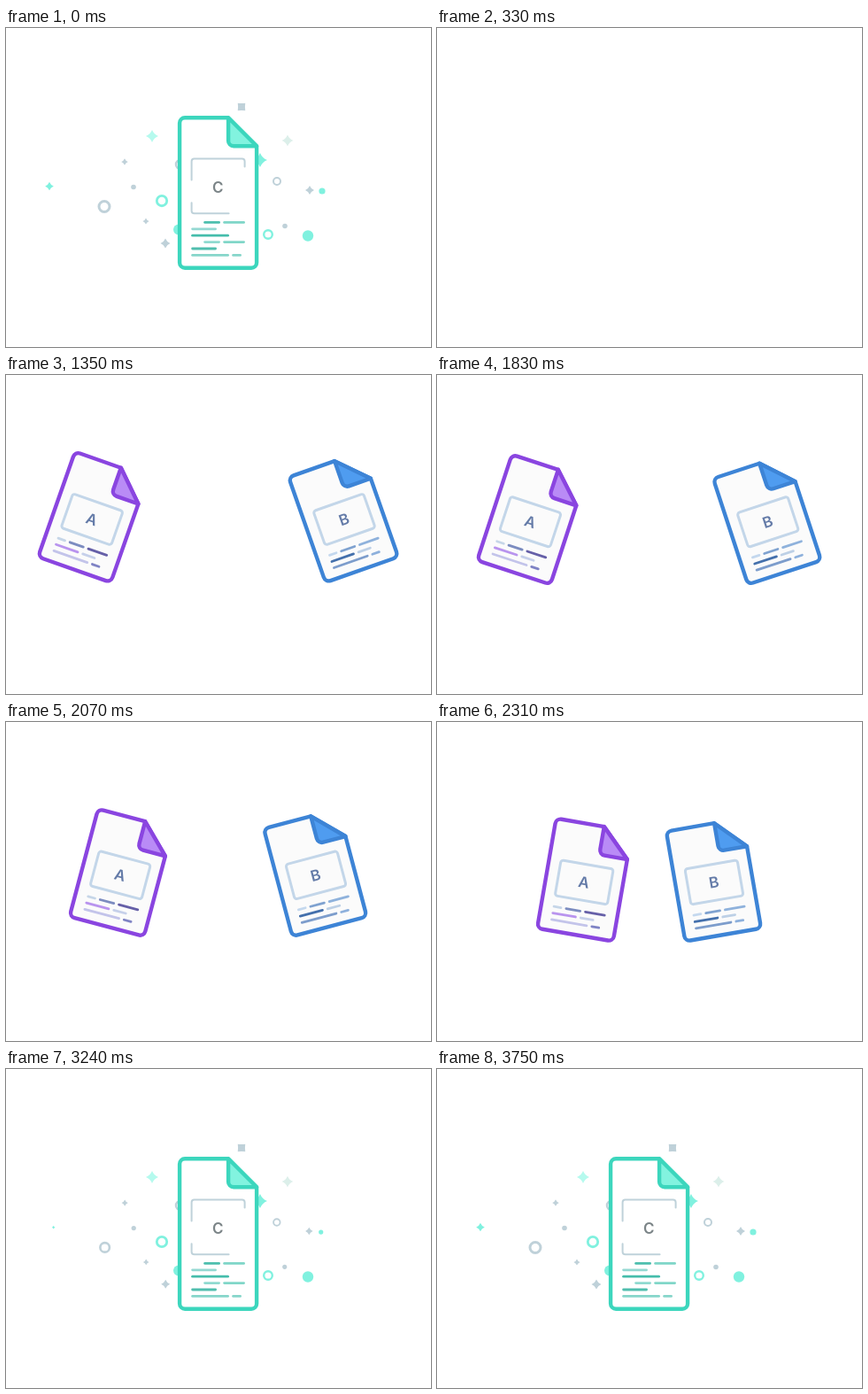
These frames come from a looping animation (480x360 px, 4500 ms). An HTML page with a canvas:

```html
<!DOCTYPE html>
<html lang="en">
<head>
<meta charset="utf-8">
<title>Two documents merge into one</title>
<style>
  html, body { margin: 0; width: 100%; height: 100%; overflow: hidden; background: #fff; }
  canvas { display: block; }
</style>
</head>
<body>
<canvas id="stage" width="480" height="360"></canvas>
<script>
const ctx = document.getElementById('stage').getContext('2d');
const LOOP = 4500, STEP = 30;
const CX = 239.6, CY = 186, SWING = 427, SWING_Y = 184.4, MAX_ANGLE = 19.85;
const HALF = 43.5, FOLD = 32;

const GREY = '#bfd1d9', CYAN = '#80f1df';
const THEMES = {
  A: { line: '#8a45e0', fold: '#b98bf6', paper: '#fbfbfb', text: '#647ba8', box: '#c3d6e9',
       dashes: ['#c6d6e8', '#7c8cc0', '#6660a8', '#b994ee', '#c6d0ea', '#c3c4ea', '#7f83c4'] },
  B: { line: '#3d84d6', fold: '#4f9cf0', paper: '#fbfbfb', text: '#647ba8', box: '#c3d6e9',
       dashes: ['#c4d8ee', '#7fa2d0', '#8fb2dc', '#4470ac', '#bdd0e6', '#7d9dcc', '#8db0dc'] },
  C: { line: '#3cd6bd', fold: '#82f3df', paper: '#fff', text: '#7b8487', box: '#bfd2da',
       dashes: [null, '#4dbfae', '#7fd6c8', '#94d8d2', null, '#45bdab', null] }
};
const LOWER_C = [null, '#8fdad0', '#80d6c8', '#50beae', null, '#86d6ca', '#86d6ca'];

// Row, start and end of each text dash
const DASHES = [[0, -29, -21], [0, -15, 1], [0, 7, 29], [1, -29, -3], [1, 3, 17], [2, -29, 11], [2, 17, 25]];

// Kind, x, y, radius, colour, delay
const PARTICLES = [
  ['clover', 266, 89, 6, GREY, 0],
  ['star', 165, 122, 7, '#b5faee', 0],
  ['star', 318, 127, 6.5, '#dcefea', 120],
  ['ring', 176, 195, 5.7, CYAN, 0],
  ['dot', 195, 227.5, 6, CYAN, 0],
  ['star', 287, 149, 8, CYAN, 30],
  ['ring', 296, 233, 4.8, CYAN, 0],
  ['dot', 341, 234.5, 6.2, CYAN, 0],
  ['ring', 197, 154, 5, GREY, 0],
  ['star', 134, 151, 3.8, GREY, 180],
  ['dot', 144, 179.5, 2.8, GREY, 210],
  ['star', 158, 218, 3.6, GREY, 210],
  ['star', 180, 243, 5.5, GREY, 240],
  ['ring', 306, 173, 4, GREY, 210],
  ['dot', 315, 223.5, 2.8, GREY, 240],
  ['ring', 111, 201.5, 6, GREY, 270],
  ['star', 343, 183, 5, GREY, 300],
  ['dot', 357, 184, 3.6, CYAN, 360],
  ['star', 49, 178.5, 4.8, CYAN, 480]
];

const clamp = v => Math.max(0, Math.min(1, v));
const easeOut = v => 1 - (1 - clamp(v)) ** 3;

function strokeLine(x1, x2, y, color) {
  ctx.strokeStyle = color;
  ctx.beginPath();
  ctx.moveTo(x1, y);
  ctx.lineTo(x2, y);
  ctx.stroke();
}

// Draws a page around the origin; grow stretches it from short (0) to tall (1)
function page(letter, grow = 0) {
  const theme = THEMES[letter], tall = letter === 'C';
  const h = 62.9 + 21.8 * grow, r = 6, cut = HALF - FOLD;
  ctx.lineCap = ctx.lineJoin = 'round';
  ctx.lineWidth = 4.4;
  ctx.strokeStyle = theme.line;

  ctx.fillStyle = theme.paper;
  ctx.beginPath();
  ctx.moveTo(cut, -h);
  ctx.lineTo(HALF, FOLD - h);
  ctx.arcTo(HALF, h, -HALF, h, r);
  ctx.arcTo(-HALF, h, -HALF, -h, r);
  ctx.arcTo(-HALF, -h, cut, -h, r);
  ctx.closePath();
  ctx.fill();
  ctx.stroke();

  ctx.fillStyle = theme.fold;
  ctx.beginPath();
  ctx.moveTo(cut, -h);
  ctx.arcTo(cut, FOLD - h, HALF, FOLD - h, r);
  ctx.lineTo(HALF, FOLD - h);
  ctx.closePath();
  ctx.fill();
  ctx.stroke();

  const top = -17.5 - 21 * grow, bottom = 23.2;
  ctx.lineWidth = 3;
  ctx.strokeStyle = theme.box;
  ctx.beginPath();
  if (tall) {
    ctx.lineWidth = 2;
    ctx.moveTo(-30, top + 24);
    ctx.arcTo(-30, top, 30, top, 3);
    ctx.arcTo(30, top, 30, bottom, 3);
    ctx.lineTo(30, top + 9);
    ctx.moveTo(-30, bottom - 12);
    ctx.arcTo(-30, bottom, 12, bottom, 3);
    ctx.lineTo(12, bottom);
  } else {
    ctx.roundRect(-30, top, 60, bottom - top, 3);
  }
  ctx.stroke();

  ctx.fillStyle = theme.text;
  ctx.font = '600 17px Inter, sans-serif';
  ctx.textAlign = 'center';
  ctx.fillText(letter, -0.3, (top + bottom) / 2 + 6 + 1.8 * grow);

  ctx.lineWidth = 2.8;
  const first = tall ? 33.4 : 35.5, pitch = tall ? 5.8 + 1.6 * grow : 7.5;
  const blocks = tall ? [theme.dashes, LOWER_C] : [theme.dashes];
  blocks.forEach((colors, b) => DASHES.forEach(([row, x1, x2], i) => {
    if (colors[i]) strokeLine(x1, x2, first + (row + 3 * b) * pitch, colors[i]);
  }));
}

function particle([kind, x, y, r, color, delay], t) {
  const size = easeOut((t - 2670 - delay) / 600);
  if (!size) return;
  const reach = 0.96 + 0.04 * size;
  ctx.save();
  ctx.translate(CX + (x - CX) * reach, CY + (y - CY) * reach);
  ctx.scale(size, size);
  ctx.fillStyle = ctx.strokeStyle = color;
  ctx.beginPath();
  if (kind === 'dot' || kind === 'ring') {
    ctx.arc(0, 0, r, 0, 2 * Math.PI);
  } else {
    if (kind === 'clover') ctx.rotate(Math.PI / 4);
    const waist = r * (kind === 'clover' ? 0.6 : 0.4);
    ctx.moveTo(r, 0);
    for (let i = 1; i <= 4; i++) {
      const end = i * Math.PI / 2, mid = end - Math.PI / 4;
      ctx.quadraticCurveTo(waist * Math.cos(mid), waist * Math.sin(mid), r * Math.cos(end), r * Math.sin(end));
    }
  }
  if (kind === 'ring') {
    ctx.lineWidth = r * 0.5;
    ctx.stroke();
  } else {
    ctx.fill();
  }
  ctx.restore();
}

// Both pages hang from a pivot high above the stage
function swingAngle(t) {
  const settle = time => 1 - Math.exp((690 - time) / 220);
  const share = t < 1500 ? settle(t) / settle(1500) : 1 - ((t - 1500) / 1140) ** 2;
  return MAX_ANGLE * share;
}

function hang(letter, degrees) {
  ctx.save();
  ctx.translate(CX, SWING_Y - SWING);
  ctx.rotate(degrees * Math.PI / 180);
  ctx.translate(0, SWING);
  page(letter);
  ctx.restore();
}

function merged(t) {
  PARTICLES.forEach(p => particle(p, t));
  ctx.save();
  ctx.translate(CX, CY);
  page('C', easeOut((t - 2640) / 480));
  ctx.restore();
}

function draw(now) {
  const t = Math.floor(now % LOOP / STEP) * STEP;
  ctx.globalAlpha = 1;
  ctx.fillStyle = '#fff';
  ctx.fillRect(0, 0, 480, 360);
  if (t < 330) {
    ctx.globalAlpha = clamp(1 - (t - 30) / 300);
    merged(LOOP);
  } else if (t >= 720 && t < 2640) {
    const angle = swingAngle(t);
    hang('A', angle);
    hang('B', -angle);
  } else if (t >= 2640) {
    merged(t);
  }
}

const start = performance.now();
function tick() {
  draw(performance.now() - start);
  requestAnimationFrame(tick);
}
tick();
</script>
</body>
</html>
```
